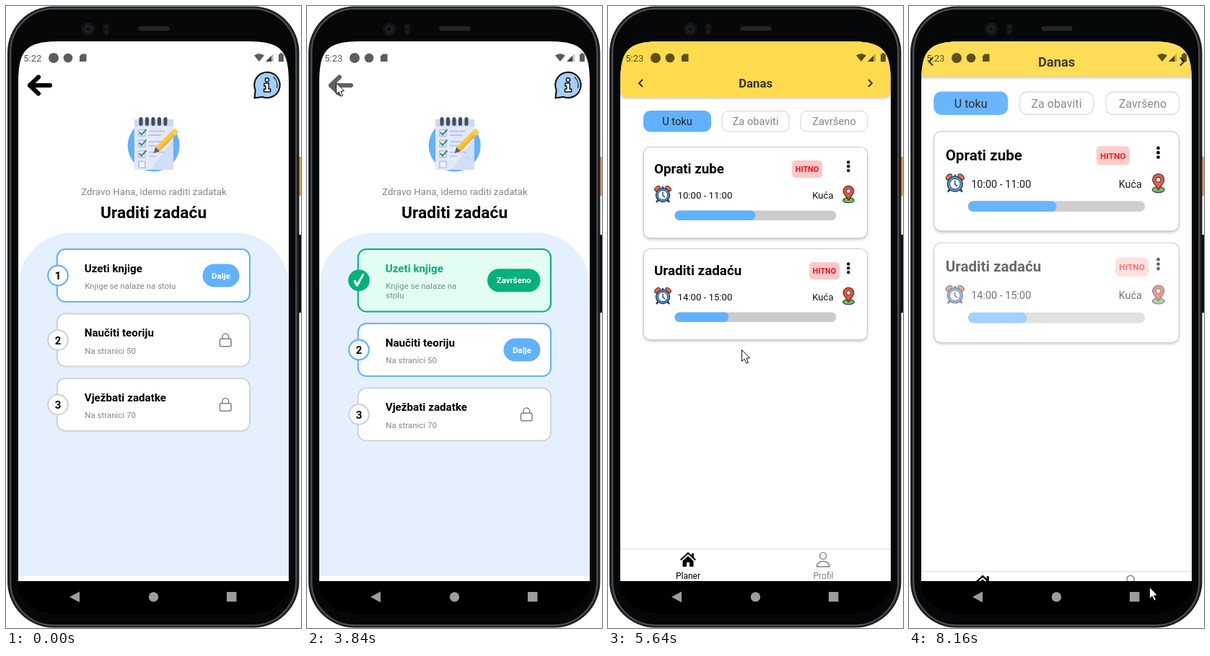
Recreate the animation shown at these times as an HTML page with a canvas. Size 409 px wide and 862 px high, loop 8200 ms.

```html
<!DOCTYPE html>
<html lang="bs">
<head>
<meta charset="utf-8">
<title>Planer</title>
<style>
html, body { margin: 0; width: 100%; height: 100%; overflow: hidden; background: #fff; }
canvas { display: block; width: 409px; height: 862px; }
</style>
</head>
<body>
<canvas id="stage"></canvas>
<script>
const W = 409, H = 862, LOOP = 8200, STEP = 40;
const BLUE = '#62b1ff', GREEN = '#04b17a', GREY = '#d3d3d3', YELLOW = '#ffdb4d';
const SCREEN = { x: 17, y: 49, w: 375, h: 748, cx: 204.5, cy: 423 };
const dpr = window.devicePixelRatio || 1;

function prepare(canvas) {
  canvas.width = Math.round(W * dpr);
  canvas.height = Math.round(H * dpr);
  const ctx = canvas.getContext('2d');
  ctx.scale(dpr, dpr);
  return ctx;
}
const stage = prepare(document.getElementById('stage'));
const buffer = document.createElement('canvas');
const layer = prepare(buffer);
let c = stage;

// ---------- helpers ----------
const clamp = v => Math.max(0, Math.min(1, v));
const span = (t, a, b) => clamp((t - a) / (b - a));
const smooth = v => v * v * (3 - 2 * v);

function paint(fill, stroke, width = 1) {
  if (fill) { c.fillStyle = fill; c.fill(); }
  if (stroke) { c.strokeStyle = stroke; c.lineWidth = width; c.stroke(); }
}
function box(x, y, w, h, r, fill, stroke, width) {
  c.beginPath();
  c.roundRect(x, y, w, h, r);
  paint(fill, stroke, width);
}
function disc(x, y, r, fill, stroke, width) {
  c.beginPath();
  c.arc(x, y, r, 0, Math.PI * 2);
  paint(fill, stroke, width);
}
function poly(points, fill, stroke, width, open) {
  c.beginPath();
  points.forEach(([x, y], i) => i ? c.lineTo(x, y) : c.moveTo(x, y));
  if (!open) c.closePath();
  paint(fill, stroke, width);
}
const line = (points, colour, width) => poly(points, null, colour, width, true);

// y is the middle of the capital letters
function text(str, x, y, size, colour, bold, align = 'left') {
  c.font = `${bold ? 'bold ' : ''}${size}px Roboto, Arial, sans-serif`;
  c.textAlign = align;
  c.fillStyle = colour;
  c.fillText(str, x, y + size * 0.356);
}
function veil(x, y, w, h, r, a) {
  if (a > 0) box(x, y, w, h, r, `rgba(255,255,255,${a})`);
}
function at(x, y, draw) {
  c.save();
  c.translate(x, y);
  draw();
  c.restore();
}
function zoomed(scale, draw) {
  c.save();
  c.translate(SCREEN.cx, SCREEN.cy);
  c.scale(scale, scale);
  c.translate(-SCREEN.cx, -SCREEN.cy);
  draw();
  c.restore();
}

// ---------- phone ----------
function phone() {
  box(405, 209, 5, 54, 1, '#e79a54');
  box(405, 317, 5, 108, 1, '#0b0b0c');
  box(2, 0.5, 404.5, 861, 64, '#17191b');
  box(4, 2, 400.5, 858, 62, '#2c2f32');
  box(6.5, 4, 395.5, 854, 60, '#060708', '#56595d', 1.5);
  disc(114, 32, 9.5, '#121417');
  disc(114, 32, 5.5, '#1d2126');
  disc(114, 32, 2.5, '#0a0c10');
  box(134.5, 24, 9, 16, 4.5, '#121416');
  disc(139, 28, 2, '#1d2024');
  disc(139, 36, 2, '#1d2024');
  box(183.5, 28, 43, 6.5, 3.2, '#232427');
  box(17, 49, 375, 792, 45, '#000');
}
// soft corners that start turning early
function screenPath() {
  const { x, y, w, h } = SCREEN, reach = 58, pull = 11, r = x + w;
  c.beginPath();
  c.moveTo(x, y + h);
  c.lineTo(x, y + reach);
  c.bezierCurveTo(x, y + pull, x + pull, y, x + reach, y);
  c.lineTo(r - reach, y);
  c.bezierCurveTo(r - pull, y, r, y + pull, r, y + reach);
  c.lineTo(r, y + h);
  c.closePath();
}
function navBar() {
  c.fillStyle = '#000';
  c.fillRect(17, 797, 375, 20);
  const grey = '#9d9d9d';
  poly([[88, 819], [102, 811.5], [102, 826.5]], grey);
  disc(204.5, 819, 6.7, grey);
  box(306, 812, 13.5, 13.5, 0.5, grey);
}
function statusBar(clock) {
  const ink = 'rgba(0,0,0,.64)';
  text(clock, 24.3, 72, 13, ink);
  disc(66, 72, 7, ink);
  disc(86, 72, 6.3, ink);
  poly([[105, 66.5], [111.5, 66.5], [111.5, 77], [102, 77], [102, 69.5]], ink);
  c.beginPath();
  c.moveTo(351, 77);
  c.lineTo(344, 68.5);
  c.quadraticCurveTo(351, 63.5, 358, 68.5);
  c.closePath();
  paint(ink);
  poly([[371, 66], [371, 77], [360, 77]], 'rgba(0,0,0,.25)');
  poly([[368, 69], [368, 77], [360, 77]], ink);
  box(378, 66.5, 7, 10.8, 1, ink);
  box(380, 65, 3, 1.5, 0, ink);
}

// ---------- icons ----------
function backArrow() {
  c.lineCap = c.lineJoin = 'round';
  line([[33, 110], [61, 110]], '#000', 6);
  line([[45, 98.5], [33, 110], [45, 121.5]], '#000', 6);
  c.lineCap = 'butt';
  c.lineJoin = 'miter';
}
function infoIcon() {
  const a = Math.PI;
  c.beginPath();
  c.arc(362, 109.5, 17.7, a * 0.87, a * 2.62);
  c.lineTo(344.5, 127.5);
  c.closePath();
  c.lineJoin = 'round';
  paint('#a3cff8', '#0b0b0b', 2);
  c.beginPath();
  c.arc(362, 109.5, 14, -0.9, 0.3);
  paint(null, '#111', 1.1);
  disc(362, 102.3, 2.6, '#fff', '#111', 1.5);
  poly([[358, 107], [364.3, 107], [364.3, 115], [366.6, 115], [366.6, 119],
    [357.6, 119], [357.6, 115], [360, 115], [360, 111], [358, 111]], '#fff', '#111', 1.5);
  c.lineJoin = 'miter';
}
function notepad() {
  disc(204.7, 193.5, 36, '#64b0fb');
  box(178, 157, 54, 70, 1.5, '#e1e9fb');
  box(178, 157, 54, 10, 1.5, '#c8dbf7');
  poly([[232, 185], [232, 227], [200, 227]], 'rgba(185,205,244,.4)');
  for (let i = 0; i < 5; i++) box(184.5 + i * 8.5, 154, 5, 12, 2.5, '#474b5a');
  for (let i = 0; i < 4; i++) {
    const y = 176 + i * 14.6;
    box(184, y - 4.5, 9, 9, 0.5, '#eef2fe', '#b9bdf0', 1.6);
    if (i < 3) {
      line([[185, y - 1], [188, y + 2.3], [194.5, y - 5]], '#3d9a63', 2.2);
      line([[198, y - 2.5], [220, y - 2.5]], '#bcc0f2', 1.8);
      line([[198, y + 3], [i === 2 ? 208 : 215, y + 3]], '#bcc0f2', 1.8);
    }
  }
  at(204.5, 204, () => {
    c.rotate(-Math.PI / 4);
    box(8, -4, 32, 8, 0, '#fbc63f');
    box(8, 0.5, 32, 3.5, 0, '#f4b52e');
    box(38, -4, 7.5, 8, [0, 3, 3, 0], '#fdce55');
    poly([[0, 0], [8, -4], [8, 4]], '#6d5a58');
  });
}
function lock(y) {
  const x = 304.3;
  c.beginPath();
  c.moveTo(x - 4.4, y - 2);
  c.lineTo(x - 4.4, y - 4.5);
  c.arc(x, y - 4.5, 4.4, Math.PI, 0);
  c.lineTo(x + 4.4, y - 2);
  paint(null, '#808080', 1.5);
  box(x - 7.8, y - 1.8, 15.6, 10.6, 2, null, '#808080', 1.5);
}
function alarm(x, y) {
  at(x, y, () => {
    line([[-6, 7], [-9, 11]], '#23344a', 2.4);
    line([[6, 7], [9, 11]], '#23344a', 2.4);
    for (const s of [-1, 1]) {
      c.beginPath();
      c.ellipse(s * 7.6, -8, 4.6, 2.9, s * 0.7, 0, Math.PI * 2);
      paint('#f0653a', '#23344a', 1);
    }
    disc(0, 1, 9.6, '#4f93e0', '#20324a', 1.2);
    disc(0, 1, 6.6, '#f6fafd', '#20324a', 0.9);
    line([[0, -3.5], [0, 1.4], [3, 4]], '#20324a', 1.3);
    line([[0, -11], [0, -9]], '#20324a', 2);
  });
}
function pin(x, y) {
  at(x, y, () => {
    c.beginPath();
    c.ellipse(0, 8.2, 7.8, 3.6, 0, 0, Math.PI * 2);
    paint('#6cbb5a', '#264036', 1.1);
    c.beginPath();
    c.moveTo(0, 8.5);
    c.bezierCurveTo(-2.5, 3, -7.3, 0, -7.3, -4.5);
    c.arc(0, -4.5, 7.3, Math.PI, 0);
    c.bezierCurveTo(7.3, 0, 2.5, 3, 0, 8.5);
    paint('#f0513f', '#4a2024', 1.1);
    disc(0, -4.5, 3, '#fff', '#4a2024', 1);
  });
}
function house() {
  at(111, 767, () => {
    box(5, -8.5, 3, 6, 0, '#000');
    line([[-10.3, 0.8], [0, -8.8], [10.3, 0.8]], '#000', 2.2);
    poly([[-7.5, 2], [0, -4.8], [7.5, 2], [7.5, 10], [2, 10], [2, 4], [-2, 4], [-2, 10], [-7.5, 10]], '#000');
  });
}
function person() {
  disc(298.2, 762, 4.6, null, '#808080', 1.4);
  c.beginPath();
  c.moveTo(289.5, 777);
  c.bezierCurveTo(289.5, 767, 307, 767, 307, 777);
  c.closePath();
  paint(null, '#808080', 1.4);
}

// ---------- task screen ----------
function pill(x, mid, w, label, fill) {
  box(x, mid - 16, w, 32, 16, fill);
  text(label, x + w / 2, mid, 11.5, '#fff', true, 'center');
}
function tick(x, y) {
  poly([[x - 7.5, y + 1], [x - 5, y - 0.8], [x - 2.4, y + 3.4], [x + 4.6, y - 8.5],
    [x + 7.6, y - 8.8], [x - 1.4, y + 8.2], [x - 3.8, y + 8.2]], '#fff');
}
function stepCard(n, top, title, notes, state) {
  const h = notes.length > 1 ? 86.5 : 73, mid = top + h / 2;
  const done = state === 'done', edge = { done: GREEN, next: BLUE, locked: GREY }[state];
  box(70.8, top, 267.2, h, 11.5, done ? '#e3fdf2' : '#fff', edge, 2.1);
  disc(72, mid, 13.8, done ? GREEN : '#fff', edge, 2.2);
  if (done) tick(72, mid);
  else text(n, 72, mid + 0.3, 15, '#000', true, 'center');
  text(title, 108.7, top + 26.3, 15.2, done ? GREEN : '#000', true);
  notes.forEach((s, i) => text(s, 109.2, top + 51 + i * 13.4, 11.5, done ? '#6f908a' : '#858585'));
  if (done) pill(250, mid, 73.5, 'Završeno', GREEN);
  else if (state === 'next') pill(272.5, mid, 51, 'Dalje', BLUE);
  else lock(mid);
}
function taskScreen(done, backFade) {
  c.fillStyle = '#fff';
  c.fillRect(SCREEN.x, SCREEN.y, SCREEN.w, SCREEN.h);
  box(17, 314, 375, 476, [75, 75, 0, 0], '#e4f0fd');
  backArrow();
  veil(26, 92, 42, 36, 0, backFade);
  infoIcon();
  notepad();
  text('Zdravo Hana, idemo raditi zadatak', 205, 257.5, 13.3, '#858585', false, 'center');
  text('Uraditi zadaću', 204.6, 286.3, 22.8, '#000', true, 'center');
  const shift = done ? 13.5 : 0;
  const notes = done ? ['Knjige se nalaze na', 'stolu'] : ['Knjige se nalaze na stolu'];
  stepCard('1', 337, 'Uzeti knjige', notes, done ? 'done' : 'next');
  stepCard('2', 426.5 + shift, 'Naučiti teoriju', ['Na stranici 50'], done ? 'next' : 'locked');
  stepCard('3', 516 + shift, 'Vježbati zadatke', ['Na stranici 70'], 'locked');
}

// ---------- list screen ----------
function tab(x, label, fill) {
  box(x + 0.5, 145.5, 93, 28.5, 9, fill || '#fff', fill || GREY, 1);
  text(label, x + 47, 160, 14.7, fill ? '#222' : '#858585', false, 'center');
}
function shadowed(blur, dy, alpha, draw) {
  c.save();
  c.shadowColor = `rgba(0,0,0,${alpha})`;
  c.shadowBlur = blur * dpr;
  c.shadowOffsetY = dy * dpr;
  draw();
  c.restore();
}
function taskCard(top, title, hours, badgeX, part) {
  shadowed(4, 2, 0.25, () => box(49.5, top + 0.5, 310, 126, 9, '#fff'));
  box(49.5, top + 0.5, 310, 126, 9, '#fff', '#c9c9c9', 1);
  text(title, 64, top + 30, 18.8, '#000', true);
  box(badgeX, top + 19, 42, 24, 5, '#ffc9c9');
  text('HITNO', badgeX + 21, top + 31.2, 10.8, '#f0141e', true, 'center');
  for (let i = 0; i < 3; i++) disc(333.3, top + 21.5 + i * 5.8, 2.2, '#000');
  alarm(76, top + 66);
  text(hours, 96.5, top + 67, 13.2, '#111');
  text('Kuća', 312.5, top + 67, 13.1, '#111', false, 'right');
  pin(333.5, top + 66);
  box(92.5, top + 88.5, 224, 13.5, 6.7, '#cbcbcb');
  box(92.5, top + 88.5, 224 * part, 13.5, 6.7, BLUE);
}
function listScreen(active, showCards, tabFade, cardFade) {
  c.fillStyle = '#fff';
  c.fillRect(SCREEN.x, SCREEN.y, SCREEN.w, SCREEN.h);
  shadowed(4, 2, 0.25, () => box(17, 40, 375, 86, [0, 0, 8, 8], YELLOW));
  line([[48, 102], [43, 107], [48, 112]], '#333', 2);
  line([[361, 102], [366, 107], [361, 112]], '#333', 2);
  text('Danas', 204.6, 107, 16.8, '#333', true, 'center');
  tab(49, 'U toku', active ? BLUE : null);
  veil(48.5, 144.5, 95, 30.5, 9, tabFade);
  tab(157.5, 'Za obaviti', active ? null : GREY);
  tab(266.5, 'Završeno', null);
  if (showCards) {
    taskCard(195, 'Oprati zube', '10:00 - 11:00', 255, 1 / 2);
    taskCard(336, 'Uraditi zadaću', '14:00 - 15:00', 279, 1 / 3);
    veil(50, 337, 309, 125, 8, cardFade);
  }
  line([[17, 752.5], [392, 752.5]], '#dedede', 1.2);
  house();
  person();
  text('Planer', 111, 790, 12, '#000', false, 'center');
  text('Profil', 298.5, 790, 12, '#808080', false, 'center');
}

// ---------- pointer ----------
const PATH = [
  [1120, 381, 250], [1440, 289, 384], [1640, 297, 375], [2040, 297, 375], [2520, 330, 694],
  [3320, 330, 694], [3400, 164, 197], [3520, 164, 197], [3640, 10, 100], [3760, 40, 106],
  [3880, 40, 106], [4160, 183, 564], [4400, 183, 564], [4800, 88, 160], [4920, 88, 160],
  [5120, 125, 268], [5240, 150, 340], [5640, 185, 476], [5800, 185, 476], [6040, 128, 440],
  [6320, 222, 402], [6640, 150, 386], [6720, 137, 384], [7000, 240, 397], [7320, 201, 383],
  [7720, 201, 383], [8040, 322, 819], [8160, 333, 805]
];
function pointer(t) {
  if (t < PATH[0][0]) return;
  let i = PATH.findIndex(k => k[0] > t);
  if (i < 0) i = PATH.length - 1;
  const [ta, xa, ya] = PATH[i - 1], [tb, xb, yb] = PATH[i];
  const k = smooth(span(t, ta, tb));
  at(Math.round(xa + (xb - xa) * k) + 0.5, Math.round(ya + (yb - ya) * k) + 0.5, () =>
    poly([[0, 0], [0, 16], [3.7, 12.6], [6.4, 18.6], [9, 17.5], [6.3, 11.6], [11, 11.3]],
      '#fff', '#111', 1));
}

// ---------- timeline ----------
const backFade = t => 0.75 * span(t, 3760, 3920);

function pop(t) {
  const p = 1 - Math.pow(span(t, 4000, 4240), 2);
  zoomed(1 + 0.1 * p, () => listScreen(false, false, 0, 0));
  veil(SCREEN.x, SCREEN.y, SCREEN.w, SCREEN.h, 0, 0.45 * p);
  c = layer;
  c.clearRect(0, 0, W, H);
  taskScreen(true, backFade(t));
  c = stage;
  c.globalAlpha = Math.pow(p, 2.3);
  zoomed(1 - 0.22 * (1 - p), () => c.drawImage(buffer, 0, 0, W, H));
  c.globalAlpha = 1;
}
function content(t) {
  if (t < 4000) return taskScreen(t >= 2120, backFade(t));
  if (t < 4240) return pop(t);
  const tabFade = 0.8 * (span(t, 4920, 5080) - span(t, 5240, 5480));
  const cardFade = 0.8 * (span(t, 7600, 7760) - 0.52 * span(t, 8000, 8160));
  const push = span(t, 7920, 8160);
  zoomed(1 + 0.095 * push * (2 - push), () => listScreen(t >= 5240, t >= 5280, tabFade, cardFade));
  veil(SCREEN.x, SCREEN.y, SCREEN.w, SCREEN.h, 0, 0.05 * push);
}
function render(t) {
  c = stage;
  c.fillStyle = '#fff';
  c.fillRect(0, 0, W, H);
  phone();
  c.save();
  screenPath();
  c.clip();
  content(t);
  statusBar(t < 3040 ? '5:22' : '5:23');
  c.restore();
  navBar();
  pointer(t);
}
function loop() {
  const t = performance.now() % LOOP;
  render(Math.floor(t / STEP) * STEP);
  requestAnimationFrame(loop);
}
loop();
</script>
</body>
</html>
```
